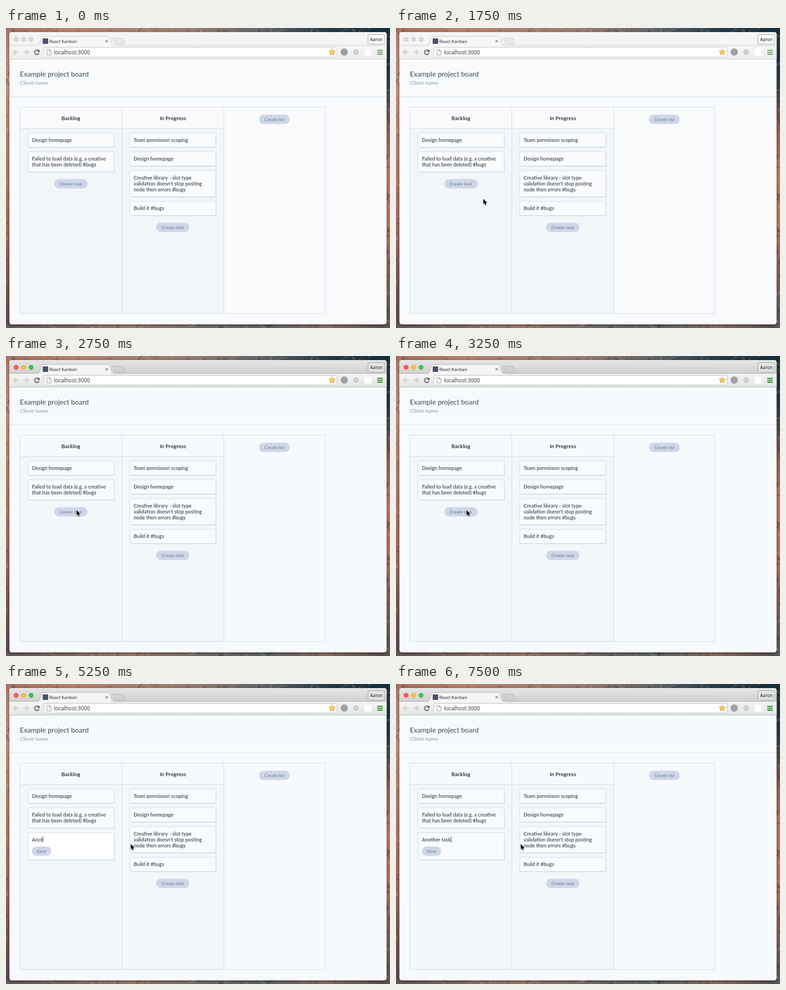
An HTML page with a canvas for the animation above (8000 ms loop, 847x661 px).

```html
<!DOCTYPE html>
<html lang="en">
<head>
<meta charset="utf-8">
<title>Kanban board</title>
<style>
html, body { margin: 0; width: 100%; height: 100%; overflow: hidden; }
canvas { display: block; width: 847px; height: 661px; }
</style>
</head>
<body>
<canvas id="stage" width="847" height="661"></canvas>
<script>
const W = 847, H = 661, LOOP = 8000, TICK = 250;
const ctx = document.getElementById('stage').getContext('2d');
const BODY = 'Lato, sans-serif';
const CHROME = '"Open Sans", sans-serif';
const LINE = '#cfd8ea';

// Pointer positions by start time.
const pointerKeys = [
  [250, 273, 368], [500, 262, 392], [750, 197, 421], [1000, 237, 430],
  [1250, 236, 426], [1500, 214, 401], [1750, 192, 376], [2000, 171, 354],
  [2250, 158, 342], [2500, 155, 339], [3750, 161, 343], [4000, 231, 349],
  [4250, 274.5, 352]
];
// Typed text by start time.
const typedKeys = [
  [3750, ''], [5000, 'An'], [5250, 'Anot'], [5500, 'Anothe'],
  [5750, 'Another'], [7000, 'Another t'], [7250, 'Another ta'], [7500, 'Another task']
];
const caretOff = [[4250, 4750], [6250, 6750]];

const latest = (keys, t) => keys.filter(k => k[0] <= t).pop();

function rect(x, y, w, h, fill, stroke, r = 0) {
  ctx.beginPath();
  ctx.roundRect(x, y, w, h, r);
  if (fill) { ctx.fillStyle = fill; ctx.fill(); }
  if (stroke) { ctx.strokeStyle = stroke; ctx.lineWidth = 1; ctx.stroke(); }
}

function circle(x, y, r, fill, stroke) {
  ctx.beginPath();
  ctx.arc(x, y, r, 0, Math.PI * 2);
  ctx.fillStyle = fill;
  ctx.fill();
  if (stroke) { ctx.strokeStyle = stroke; ctx.lineWidth = 0.8; ctx.stroke(); }
}

function path(points, fill, stroke, width = 1, close = true) {
  ctx.beginPath();
  points.forEach(([x, y], i) => i ? ctx.lineTo(x, y) : ctx.moveTo(x, y));
  if (close) ctx.closePath();
  if (fill) { ctx.fillStyle = fill; ctx.fill(); }
  if (stroke) { ctx.strokeStyle = stroke; ctx.lineWidth = width; ctx.stroke(); }
}

const line = (x1, y1, x2, y2, color, width = 1) =>
  path([[x1, y1], [x2, y2]], null, color, width, false);

function text(str, x, y, font, color, align = 'left') {
  ctx.font = font;
  ctx.fillStyle = color;
  ctx.textAlign = align;
  ctx.fillText(str, x, y);
}

function gradient(x1, y1, x2, y2, colors) {
  const g = ctx.createLinearGradient(x1, y1, x2, y2);
  colors.forEach((c, i) => g.addColorStop(i / (colors.length - 1), c));
  return g;
}

function wallpaper() {
  let seed = 11;
  const rnd = () => (seed = (seed * 16807) % 2147483647) / 2147483647;
  const strip = (x, y, w, h, colors) => {
    ctx.save();
    ctx.beginPath();
    ctx.rect(x, y, w, h);
    ctx.clip();
    ctx.fillStyle = w > h ? gradient(0, 0, W, 0, colors) : gradient(0, 0, 0, H, colors);
    ctx.fillRect(x, y, w, h);
    for (let i = 0; i < 90; i++) {
      const px = x + rnd() * w, py = y + rnd() * h;
      const tone = ['rgba(30,35,42,.28)', 'rgba(240,196,172,.25)', 'rgba(122,66,52,.25)'][i % 3];
      line(px, py, px + rnd() * 24 - 6, py + rnd() * 26 - 13, tone, 1 + rnd() * 3);
    }
    ctx.restore();
  };
  strip(0, 0, W, 12, ['#a87462', '#b98370', '#a68270', '#947b70', '#63666a', '#263f4c', '#142f3c']);
  strip(0, 649, W, 12, ['#65585a', '#806d68', '#a37f70', '#77706e', '#606669', '#8c7166', '#5b5554']);
  strip(0, 8, 12, 645, ['#b57b67', '#cf937d', '#c18169', '#b8755f', '#a96c59', '#80584f', '#5a4e51']);
  strip(835, 8, 12, 645, ['#16303d', '#273b46', '#8b6255', '#bd8068', '#b2735d', '#80645c', '#565558']);
}

function arrow(x, dir, color) {
  line(x - 6 * dir, 53.5, x + 5 * dir, 53.5, color, 2);
  path([[x, 48.5], [x + 5.5 * dir, 53.5], [x, 58.5]], null, color, 2, false);
}

function reload() {
  ctx.beginPath();
  ctx.arc(68, 53.5, 5, 0.35, Math.PI * 1.78);
  ctx.strokeStyle = '#5c5c5c';
  ctx.lineWidth = 2;
  ctx.stroke();
  path([[74, 47], [74, 53], [68.5, 52.5]], '#5c5c5c');
}

function star(x, y) {
  const points = Array.from({ length: 10 }, (_, i) => {
    const a = -Math.PI / 2 + i * Math.PI / 5, r = i % 2 ? 3.6 : 7.6;
    return [x + r * Math.cos(a), y + r * Math.sin(a)];
  });
  path(points, '#fdc65f', '#c99d52');
}

function browser(active) {
  ctx.save();
  ctx.shadowColor = 'rgba(0,0,0,.45)';
  ctx.shadowBlur = active ? 10 : 7;
  ctx.shadowOffsetY = 2;
  rect(7.5, 9, 832, 644, '#f7fafc', null, 5);
  ctx.restore();

  ctx.save();
  ctx.beginPath();
  ctx.roundRect(7.5, 9, 832, 644, 5);
  ctx.clip();

  const edge = active ? '#acacac' : '#c6c6c6';
  rect(7, 9, 833, 30, active ? gradient(0, 9, 0, 39, ['#e5e5e5', '#d0d0d0']) : '#f4f4f4');
  line(7, 38.5, 840, 38.5, edge);
  line(8, 9.5, 839, 9.5, '#fafafa');
  rect(7, 39, 833, 30, gradient(0, 39, 0, 68, active ? ['#f4f4f4', '#e5e5e5'] : ['#f6f6f6', '#ededed']));
  line(7, 68.5, 840, 68.5, active ? '#b5b5b5' : '#cccccc');

  const tab = [[69, 39], [73, 36], [79, 21], [82, 18.5], [226, 18.5], [229, 21], [234, 36], [238, 39]];
  path(tab, active ? '#f4f4f4' : '#f6f6f6', edge, 1, false);
  path([[236, 24], [238, 22.5], [255, 22.5], [258, 24], [262, 34], [260, 35.5], [244, 35.5], [241, 34]],
    active ? '#d2d2d2' : '#e9e9e9', edge);

  const lights = active ? ['#fc5753', '#fdbc40', '#33c748'] : ['#d9d9d9', '#d9d9d9', '#d9d9d9'];
  const rims = active ? ['#df4744', '#de9f34', '#27aa35'] : ['#c2c2c2', '#c2c2c2', '#c2c2c2'];
  lights.forEach((c, i) => circle(22.3 + i * 16.5, 25, 4.9, c, rims[i]));

  rect(81, 23, 12, 12, '#4a5264');
  text('React Kanban', 95.5, 32.5, '9.6px ' + CHROME, '#1c1c1c');
  line(219.5, 26.5, 224.5, 31.5, '#7b7b7b', 1.2);
  line(224.5, 26.5, 219.5, 31.5, '#7b7b7b', 1.2);

  rect(798.5, 14.5, 36.5, 21, active ? '#e4e4e4' : '#fafafa', '#a0a0a0', 2);
  text('Aaron', 817, 29, '10px ' + CHROME, '#1c1c1c', 'center');

  arrow(22, -1, '#c9c9c9');
  arrow(44, 1, '#c9c9c9');
  reload();

  rect(83.5, 42.5, 646.5, 21.5, '#fff', active ? '#b4b4b4' : '#c2c2c2', 2);
  path([[90.5, 47.5], [95.5, 47.5], [99.5, 51.5], [99.5, 59.5], [90.5, 59.5]], '#fff', '#858585');
  path([[95.5, 47.5], [95.5, 51.5], [99.5, 51.5]], null, '#858585', 1, false);
  text('localhost:3000', 105.5, 58, '11.8px ' + CHROME, '#303030');
  star(719.5, 53.5);

  circle(746, 53, 8, '#a0a0a0');
  circle(772, 53, 6.5, '#d0d0d0');
  rect(791, 46, 15, 15, '#fff');
  for (let i = 0; i < 3; i++) {
    rect(819, 48 + i * 4.3, 12, 2.3, active ? '#298a22' : '#65a458');
  }
  ctx.restore();
}

function card(x, y, h, lines, fill) {
  rect(x + 1, y + 1.5, 190, h, 'rgba(186,201,224,.55)', null, 2);
  rect(x, y, 190, h, fill, LINE, 2);
  lines.forEach((s, i) =>
    text(s, x + 8.7, y + 19.3 + i * 13.3, '500 11.2px ' + BODY, '#343a41'));
}

function button(label, x, y, w) {
  rect(x, y, w, 20.6, '#ced6e8', null, 10.3);
  text(label, x + w / 2, y + 14, '700 10px ' + BODY, '#8490a4', 'center');
}

function board(t, active) {
  const bg = active ? '#f6fafc' : '#f8fafc';
  const head = active ? '#f7fafc' : '#f9fafc';
  const column = active ? '#f3f7f9' : '#f2f6f8';
  const paper = active ? '#f8fbfd' : '#f9fbfd';
  rect(8, 69, 831, 578, bg);

  text('Example project board', 30.5, 106.7, '500 15.4px ' + BODY, '#4d5660');
  text('Client name', 30.5, 125, '700 11.8px ' + BODY, '#a0b5ba');
  line(8, 151.5, 839, 151.5, '#d0d9e5');

  rect(31, 175, 449, 47, head);
  rect(31, 222, 449, 407, column);
  rect(30.5, 174.5, 673, 454.5, null, LINE);
  line(255.5, 175, 255.5, 629, LINE);
  line(480.5, 175, 480.5, 629, LINE);
  line(31, 221.5, 480, 221.5, LINE);
  text('Backlog', 143, 203, '700 11.8px ' + BODY, '#333840', 'center');
  text('In Progress', 368, 203, '700 11.8px ' + BODY, '#333840', 'center');
  button('Create list', 558, 191, 68);

  card(48.5, 231.5, 31, ['Design homepage'], paper);
  card(48.5, 272.8, 44.2, ['Failed to load data (e.g. a creative', 'that has been deleted) #bugs'], paper);

  card(272.8, 231.5, 31, ['Team permisson scoping'], paper);
  card(272.8, 272.8, 31, ['Design homepage'], paper);
  card(272.8, 314.2, 57.5, ['Creative library - slot type', "validation doesn't stop posting", 'node then errors #bugs'], paper);
  card(272.8, 382, 31, ['Build it #bugs'], paper);
  button('Create task', 331, 429, 73.5);

  const typed = latest(typedKeys, t);
  if (!typed) {
    button('Create task', 106.5, 333, 73.5);
    return;
  }
  card(48.5, 327.5, 60, [typed[1]], t < 6750 ? '#fff' : paper);
  button('Save', 57, 358, 43);
  if (!caretOff.some(([from, to]) => t >= from && t < to)) {
    ctx.font = '500 11.2px ' + BODY;
    const x = Math.round(57 + ctx.measureText(typed[1]).width);
    rect(x, 336, 1, 13.5, '#30343a');
  }
}

function pointer(t) {
  const key = latest(pointerKeys, t);
  if (!key) return;
  ctx.save();
  ctx.translate(key[1], key[2]);
  ctx.shadowColor = 'rgba(0,0,0,.35)';
  ctx.shadowBlur = 2;
  ctx.shadowOffsetY = 1;
  const shape = [[0.7, 0.5], [0.7, 12], [3.2, 9.7], [5, 14], [7.2, 13], [5.4, 8.9], [9, 8.9]];
  ctx.lineJoin = 'round';
  path(shape, null, '#fff', 1.8);
  ctx.shadowColor = 'transparent';
  path(shape, '#000');
  ctx.restore();
}

function draw(t) {
  const active = t >= 2750;
  ctx.clearRect(0, 0, W, H);
  wallpaper();
  browser(active);
  board(t, active);
  pointer(t);
}

let shown = -1;
function frame() {
  const t = Math.floor((performance.now() % LOOP) / TICK) * TICK;
  if (t !== shown) draw(shown = t);
  requestAnimationFrame(frame);
}
frame();
</script>
</body>
</html>
```
